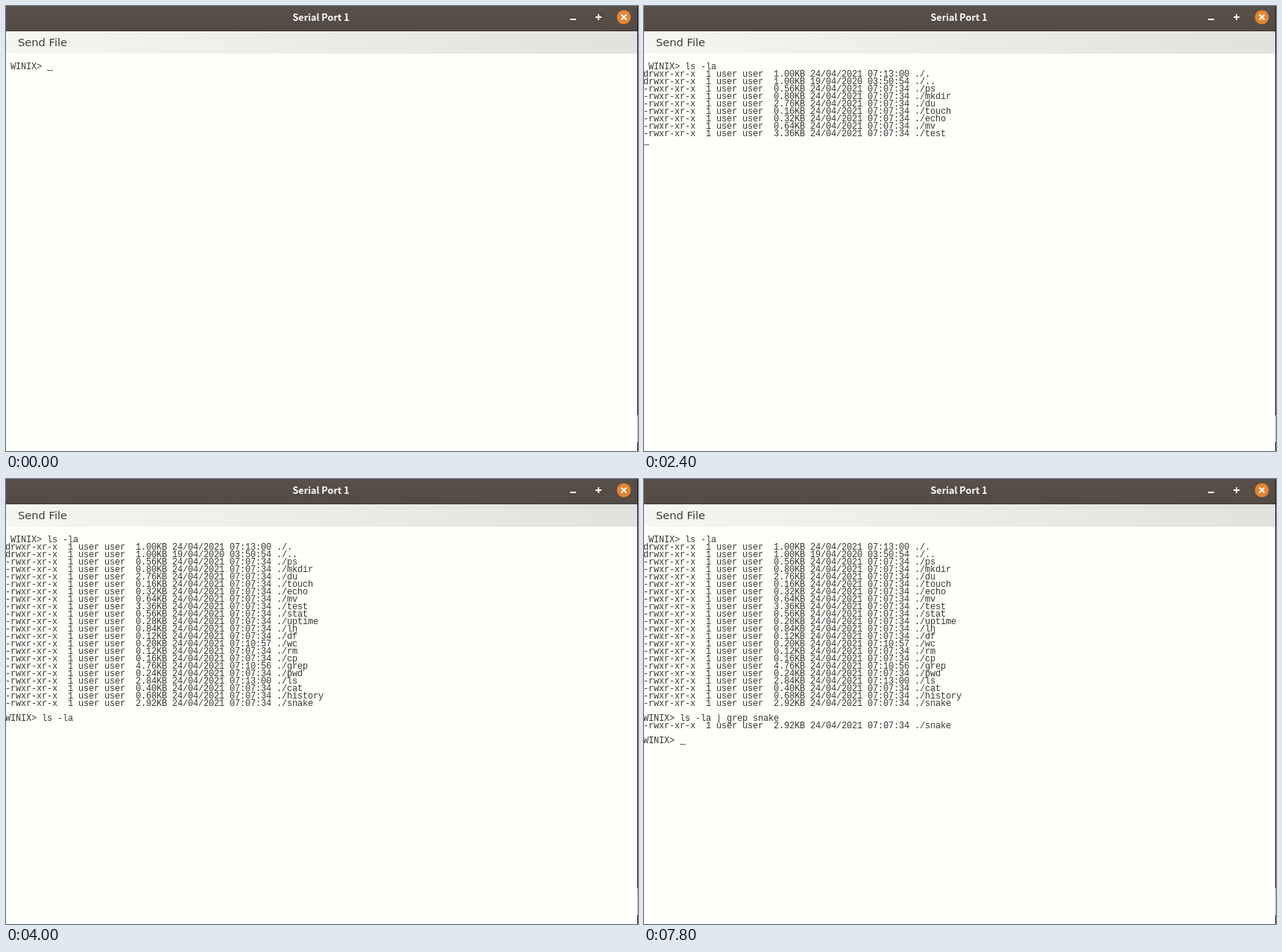
Write an HTML page with a canvas that moves like this. It is 848 by 598 pixels and loops after 8 s.

```html
<!DOCTYPE html>
<html lang="en">
<head>
<meta charset="utf-8">
<title>Serial Port 1</title>
<style>
  html, body { margin: 0; width: 100%; height: 100%; overflow: hidden; background: #fffffc; }
  canvas { display: block; }
</style>
</head>
<body>
<canvas id="stage" width="848" height="598"></canvas>
<script>
const ctx = document.getElementById('stage').getContext('2d');
const LOOP = 8000, STEP = 100;
const CELL = 7, ROW = 10, LEFT = -1, BASELINE = 85;

// name, size in KB, optional time
const files = `. 1.00 07:13:00|.. 1.00 03:50:54|ps 0.56|mkdir 0.80|du 2.76|touch 0.16|echo 0.32|mv 0.64
test 3.36|stat 0.56|uptime 0.28|lh 0.84|df 0.12|wc 0.20 07:10:57|rm 0.12|cp 0.16|grep 4.76 07:10:56
pwd 0.24|ls 2.84 07:13:00|cat 0.40|history 0.68|snake 2.92`;

const rows = files.split(/[|\n]/).map(entry => {
  const [name, size, time = '07:07:34'] = entry.split(' ');
  const type = name[0] === '.' ? 'd' : '-';
  const date = name === '..' ? '19/04/2020' : '24/04/2021';
  return `${type}rwxr-xr-x  1 user user  ${size}KB ${date} ${time} ./${name}\n`;
});
const listing = rows.join('');
const snakeRow = rows[rows.length - 1];
const prompt = '\nWINIX> ';

// Part of the listing between two [row, column] positions, with the cursor behind it.
const offset = ([row, col]) => rows.slice(0, row).join('').length + col;
const part = (from, to) => listing.slice(offset(from), offset(to)) + '_';
const stops = [[2, 30], [5, 45], [9, 0], [12, 12], [15, 24], [18, 35], [21, 47]];
const burst = stops.slice(1).map((stop, i) => part(stops[i], stop));

// Each run appends one piece per step; a final "_" shows the cursor.
const runs = [
  [0, [' WINIX> _']],
  [300, ['', 'l_', '', 's_', '', ' _', '', '-_']],
  [1200, ['', 'l_', '', 'a_', '']],
  [1900, ['\n_']],
  [2100, [part([0, 0], stops[0])]],
  [2300, [...burst, listing.slice(offset([21, 47])) + prompt, '_']],
  [3300, ['', '_']],
  [3600, ['l_', 's_', ' -_', 'la_', '', '_', '', ' _', '', '|_', '']],
  [4800, [' _', '', 'g_', 'r_', 'e_', '', 'p_']],
  [5600, [' _', 's_', 'n_']],
  [6000, ['a_', 'k_', 'e_', '', '\n_']],
  [6700, ['', '_', '']],
  [7100, [0, 10, 20, 31].map((from, i) => snakeRow.slice(from, [10, 20, 31, 41][i]) + '_')],
  [7600, [snakeRow.slice(41) + prompt + '_', '', '_']]
];

let typed = '';
const states = runs.flatMap(([start, pieces]) => pieces.map((piece, i) => {
  const cursor = piece.endsWith('_');
  typed += cursor ? piece.slice(0, -1) : piece;
  return { time: start + i * STEP, text: typed, cursor };
}));

function rect(color, x, y, w, h) {
  ctx.fillStyle = color;
  ctx.fillRect(x, y, w, h);
}

function label(text, x, y, font, color, align = 'left') {
  ctx.font = font;
  ctx.fillStyle = color;
  ctx.textAlign = align;
  ctx.fillText(text, x, y);
}

function gradient(x, y, from, to) {
  const fill = ctx.createLinearGradient(0, 0, x, y);
  fill.addColorStop(0, from);
  fill.addColorStop(1, to);
  return fill;
}

function drawWindow() {
  rect('#fffffc', 0, 0, 848, 598);
  rect(gradient(0, 33, '#59504a', '#534a44'), 0, 0, 848, 33);
  rect('#403934', 0, 33, 848, 1);
  rect(gradient(848, 0, '#f5f6f1', '#e1e2dd'), 0, 34, 848, 30);
  label('Serial Port 1', 422.5, 20, 'bold 12.667px "Noto Sans CJK JP", "Noto Sans CJK", sans-serif', '#fff', 'center');
  label('Send File', 16, 54, '14.667px "DejaVu Sans", sans-serif', '#3c3c38');

  rect('#fff', 757, 17, 8, 2);
  rect('#fff', 791, 14, 8, 2);
  rect('#fff', 794, 11, 2, 8);
  ctx.fillStyle = '#e58432';
  ctx.beginPath();
  ctx.arc(829, 15, 9.4, 0, 2 * Math.PI);
  ctx.fill();
  ctx.strokeStyle = '#fff';
  ctx.lineWidth = 2;
  ctx.beginPath();
  ctx.moveTo(825.5, 11.5);
  ctx.lineTo(832.5, 18.5);
  ctx.moveTo(832.5, 11.5);
  ctx.lineTo(825.5, 18.5);
  ctx.stroke();

  rect('#1c1a18', 847, 0, 1, 598);
  rect('#b5b5b2', 847, 550, 1, 36);
}

function drawTerminal({ text, cursor }) {
  const lines = text.split('\n');
  lines.forEach((line, row) => [...line].forEach((char, col) =>
    label(char, LEFT + col * CELL, BASELINE + row * ROW, '12px "Liberation Mono", monospace', '#363632')));
  if (cursor) {
    const row = lines.length - 1;
    rect('#62625e', LEFT + lines[row].length * CELL, BASELINE + row * ROW + 1, 8, 1);
  }
}

function frame() {
  const time = performance.now() % LOOP;
  drawWindow();
  drawTerminal(states.findLast(state => state.time <= time));
  requestAnimationFrame(frame);
}
frame();
</script>
</body>
</html>
```
